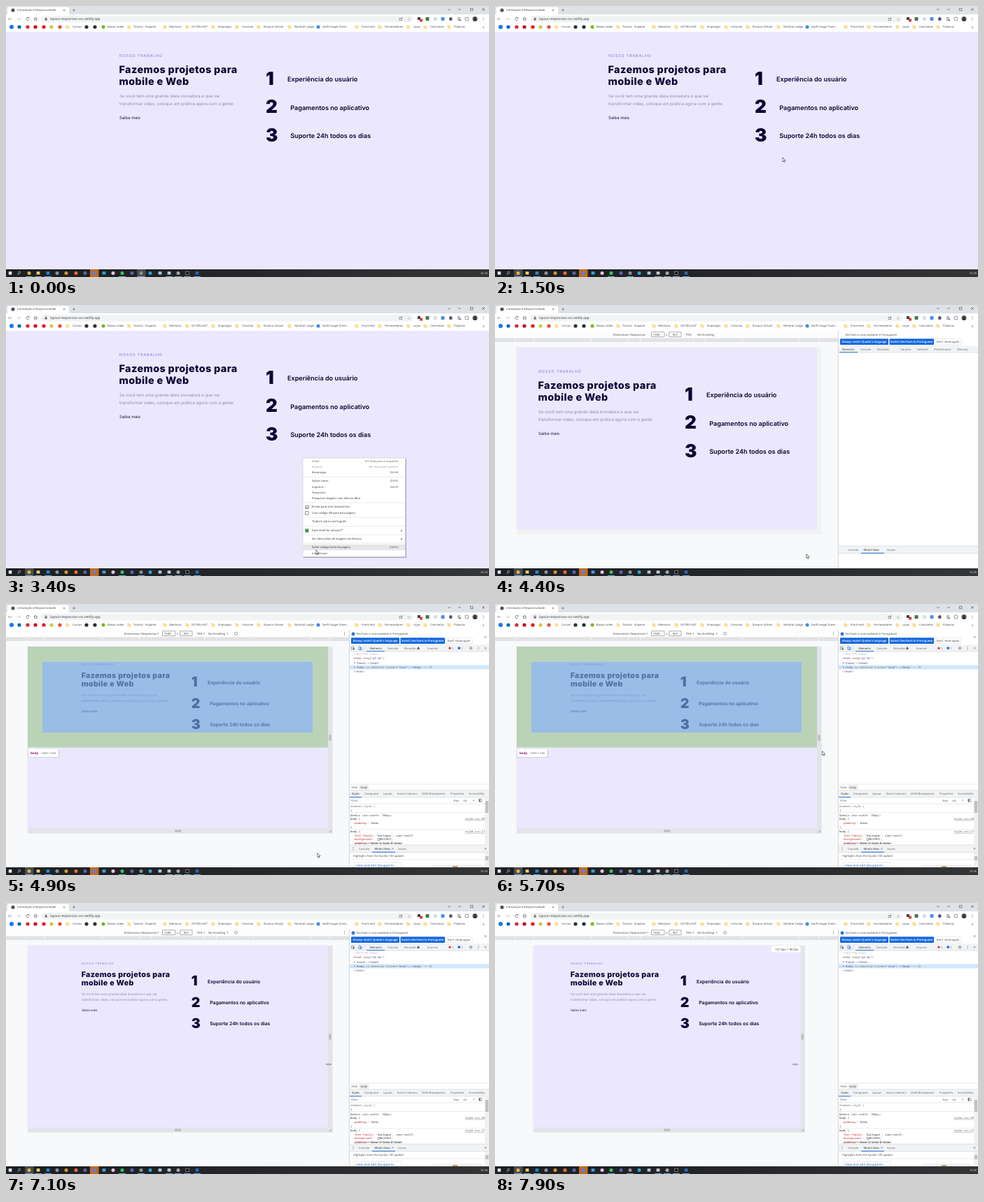
An HTML page with a canvas that plays this animation: 690 by 388 pixels, repeating every 8000 ms.

```html
<!DOCTYPE html>
<html lang="pt-br">
<head>
<meta charset="utf-8">
<title>Layout responsivo</title>
<style>
html, body { margin: 0; width: 100%; height: 100%; overflow: hidden; background: #fff; }
canvas { display: block; width: 690px; height: 388px; }
</style>
</head>
<body>
<canvas id="stage"></canvas>
<script>
const W = 690, H = 388, LOOP = 8000;
const UI = '"Open Sans", sans-serif', MONO = '"Noto Sans Mono", monospace', PAGE = 'Inter, sans-serif';
const LILAC = '#ebe8fd', NAVY = '#0b0432', BLUE = '#1669db', GREY = '#5f6368';

const canvas = document.getElementById('stage');
const ctx = canvas.getContext('2d');
const ratio = window.devicePixelRatio || 1;
canvas.width = W * ratio;
canvas.height = H * ratio;
ctx.textRendering = 'geometricPrecision';

const clamp01 = v => Math.max(0, Math.min(1, v));

function rect(color, x, y, w, h, r = 0) {
  ctx.fillStyle = color;
  ctx.beginPath();
  ctx.roundRect(x, y, w, h, r);
  ctx.fill();
}

function frame(color, x, y, w, h, r = 0) {
  ctx.strokeStyle = color;
  ctx.lineWidth = 0.6;
  ctx.beginPath();
  ctx.roundRect(x, y, w, h, r);
  ctx.stroke();
}

function dot(color, x, y, r) {
  ctx.fillStyle = color;
  ctx.beginPath();
  ctx.arc(x, y, r, 0, Math.PI * 2);
  ctx.fill();
}

function line(color, width, ...points) {
  ctx.strokeStyle = color;
  ctx.lineWidth = width;
  ctx.beginPath();
  for (let i = 0; i < points.length; i += 2) ctx.lineTo(points[i], points[i + 1]);
  ctx.stroke();
}

function poly(color, ...points) {
  ctx.fillStyle = color;
  ctx.beginPath();
  for (let i = 0; i < points.length; i += 2) ctx.lineTo(points[i], points[i + 1]);
  ctx.fill();
}

// y is the middle of the capital letters
function text(str, x, y, size = 4.1, color = '#3c4043', o = {}) {
  ctx.font = `${o.weight || 400} ${size}px ${o.font || UI}`;
  ctx.textAlign = o.align || 'left';
  ctx.letterSpacing = `${o.spacing || 0}px`;
  ctx.fillStyle = color;
  ctx.fillText(str, x, y + size * 0.36);
}

function cross(x, y, r, color = GREY) {
  line(color, 0.6, x - r, y - r, x + r, y + r);
  line(color, 0.6, x - r, y + r, x + r, y - r);
}

function kebab(x, y, color = GREY) {
  for (const d of [-1.8, 0, 1.8]) dot(color, x, y + d, 0.5);
}

function folder(x, y) {
  rect('#edc95c', x - 2.4, y - 2.4, 2.4, 2);
  rect('#fbdf8c', x - 2.4, y - 1.7, 4.9, 4.1, 0.4);
}

function caret(x, y, color = GREY) {
  poly(color, x - 1.2, y - 0.6, x + 1.2, y - 0.6, x, y + 0.9);
}

function triangle(x, y, color = GREY) {
  poly(color, x, y - 1.2, x + 1.6, y, x, y + 1.2);
}

const BOOKMARKS = [
  [88, 95, 'Cursos'], [139, 145, 'Baixar vídeo', '#7cb518'], [176, 182, 'Tutoria - Viajante'],
  [227, 233, 'Mentoria'], [259, 265, 'GIT/ZELHUT'], [296, 303, 'Empregos'], [330, 337, 'Convívio'],
  [361, 368, 'Ruvano School'], [405, 412, 'Nimbral Lodge'], [446, 452, 'Swift Image Tuner...', '#3c8bea'],
  [501, 508, 'Front-end'], [534, 541, 'Fornecedores'], [575, 582, 'Lojas'],
  [599, 606, 'Camisetas'], [633, 640, 'Palavras']
];

function browserBars() {
  rect('#dee1e6', 0, 0, W, 13);
  rect('#fff', 2, 1.5, 88, 12, 2.5);
  rect('#fff', 0, 12, W, 25);
  dot('#50555b', 10, 6, 2.6);
  text('Introdução à Responsividade', 16, 6, 4.1);
  cross(83, 6, 1.3);
  line(GREY, 0.6, 95, 6, 99, 6);
  line(GREY, 0.6, 97, 4, 97, 8);
  line('#444', 0.6, 631, 4, 633, 6, 635, 4);
  line('#444', 0.6, 646, 5, 650, 5);
  frame('#444', 663.5, 3.3, 3.4, 3.4);
  cross(682, 5, 1.7, '#333');

  for (const [x, d, c] of [[6, -1, '#999da1'], [18, 1, '#c0c3c6']]) {
    line(c, 0.7, x - 2.5, 18.5, x + 2.5, 18.5);
    line(c, 0.7, x + d * 0.5, 16.5, x + d * 2.5, 18.5, x + d * 0.5, 20.5);
  }
  ctx.strokeStyle = GREY;
  ctx.lineWidth = 0.8;
  ctx.beginPath();
  ctx.arc(31, 18.5, 2.1, 0.5, 5.6);
  ctx.stroke();
  poly(GREY, 31.3, 18, 33.3, 18, 33.3, 16);
  line(GREY, 0.8, 39.6, 18.5, 42.3, 16, 45, 18.5);
  frame(GREY, 40.5, 18.3, 3.6, 2.5);
  rect('#f1f3f4', 50, 14, 532, 9.4, 4.7);
  rect(GREY, 55.6, 18, 3, 2.6, 0.3);
  frame(GREY, 56.2, 16.4, 1.8, 2.2, 0.8);
  text('layout-responsivo-css.netlify.app', 63, 18.6, 4.73, '#303236');
  frame(GREY, 562, 17.5, 3.6, 3);
  line(GREY, 0.7, 564, 18.5, 566.5, 16.3);
  text('☆', 576, 18.5, 6, GREY, { align: 'center', font: '"DejaVu Sans", sans-serif' });

  rect('#34434e', 588, 16, 4, 4);
  rect('#e53935', 591, 18.5, 4, 4, 0.6);
  rect('#44784a', 599.5, 16, 5, 5, 0.5);
  rect('#d7dcea', 611, 16, 5, 5, 1);
  rect('#4b8df5', 621.5, 16, 5, 5, 1);
  rect('#50555b', 633.2, 16.8, 4.2, 4, 0.5);
  dot('#50555b', 635.3, 16.7, 1);
  for (const y of [16.7, 18.5, 20.3]) line('#50555b', 0.7, 645, y, 649, y);
  dot('#50555b', 649, 20.4, 1);
  frame('#50555b', 656, 16.2, 4.5, 4.5, 0.5);
  dot('#69635f', 670, 18.5, 3.6);
  dot('#252129', 670, 17.6, 1.4);
  rect('#252129', 667.8, 19.2, 4.4, 2, 1);
  kebab(682, 18.5);

  dot('#1877f2', 8, 30, 3);
  const marks = [[19, '#0a66c2'], [31, '#df2638'], [42, '#c8101c'], [54, '#f0141e'], [65, '#c4cd48'],
    [77, '#de5043'], [115, '#303030'], [127, '#25313c']];
  for (const [x, c] of marks) dot(c, x, 30, 2.6);
  for (const [ix, tx, label, color] of BOOKMARKS) {
    if (color) dot(color, ix, 30, 2.5); else folder(ix, 30);
    text(label, tx, 30, 4.1);
  }
  text('»', 682, 29.8, 5.5, '#444', { align: 'center' });
}

const TASKS = [
  [33, '#e0b43c'], [46, '#f5cf68'], [60, '#2489d1'], [73, '#8a929a'], [86, '#d79a2f'], [100, '#f06c36'],
  [113, '#5965a8'], [126, '#5b7df0'], [140, '#3ca0e0'], [153, '#e6c6df'], [166, '#38c763'], [180, '#5a62b7'],
  [193, '#8c9096'], [206, '#2ca4dc'], [220, '#a7cbe3'], [233, '#c9cccf'], [246, '#aaa69c'],
  [259, '#0b0d0e'], [273, '#2d67b8']
];

function taskbar(t) {
  const shade = ctx.createLinearGradient(0, 0, W, 0);
  shade.addColorStop(0, '#1c1f23');
  shade.addColorStop(0.4, '#222427');
  shade.addColorStop(1, '#343537');
  rect(shade, 0, 377, W, 11);
  rect('#484c52', t < 100 ? 187 : 27, 377, 12.5, 11);
  rect('#c06c22', 120, 377, 12.5, 11);
  rect('#e6eaee', 3.8, 380.2, 4.5, 4.5);
  frame('#ddd', 17.8, 380.2, 3, 3, 1.5);
  line('#ddd', 0.7, 18.2, 383, 16.8, 385);
  TASKS.forEach(([x, c], i) => {
    if ([1, 2, 8, 14, 15, 17, 18].includes(i)) rect(c, x - 2.4, 380.2, 4.8, 4.4, 0.5);
    else dot(c, x, 382.4, 2.5);
    if (x === 259) frame('#b6babd', 256.6, 380.2, 4.8, 4.4);
    if ([0, 1, 2, 10, 12, 15, 16, 17, 18].includes(i)) rect('#76a9d5', x - 5, 387, 10, 1);
  });
  text(t < 5300 ? '16:35' : '16:36', 688, 382.5, 4, '#f0f0f0', { align: 'right' });
}

function landing(dx, dy, scale) {
  const put = (str, x, y, size, color, weight, spacing) =>
    text(str, x, y, size, color, { font: PAGE, weight, spacing });
  ctx.save();
  ctx.translate(dx, dy);
  ctx.scale(scale, scale);
  put('NOSSO TRABALHO', 162, 71, 5.4, '#7d70da', 400, 0.85);
  put('Fazemos projetos para', 161.5, 91, 14.4, NAVY, 800, 0.38);
  put('mobile e Web', 161.5, 107.8, 14.4, NAVY, 800, 0.38);
  put('Se você tem uma grande ideia inovadora e que vai', 162, 128.5, 6, '#8d88a3');
  put('transformar vidas, coloque em prática agora com a gente.', 162, 140, 6, '#8d88a3');
  put('Saiba mais', 162, 160, 5.9, '#1b1540');
  ['Experiência do usuário', 'Pagamentos no aplicativo', 'Suporte 24h todos os dias'].forEach((label, i) => {
    const y = 103.6 + i * 40.3;
    put(String(i + 1), 371, y, 26, NAVY, 900);
    put(label, i ? 406.2 : 402, y + 1.4, 9.1, NAVY, 600);
  });
  ctx.restore();
}

const MENU = [
  [224, 'Voltar', 'Alt+Seta para a esquerda'], [232, 'Avançar', 'Alt+Seta para a direita'],
  [240, 'Recarregar', 'Ctrl+R'], [252, 'Salvar como...', 'Ctrl+S'], [261, 'Imprimir...', 'Ctrl+P'],
  [269, 'Transmitir...'], [277, 'Pesquisar imagens com Zelvora Mira'], [289, 'Enviar para seus dispositivos'],
  [298, 'Criar código QR para esta página'], [310, 'Traduzir para o português'],
  [323, 'Dark Shelf for Zelvora™'], [335, 'Ver descrições de imagens do Zelvora'],
  [347, 'Exibir código fonte da página', 'Ctrl+U'], [356, 'Inspecionar']
];

function contextMenu(pointer, alpha) {
  ctx.save();
  ctx.globalAlpha = alpha;
  rect('rgba(60,60,80,.35)', 425, 220.5, 147, 141.5);
  rect('#fff', 424, 219, 146.5, 141.5);
  frame('#c4c4cc', 424, 219, 146.5, 141.5);
  for (const [y, label, keys] of MENU) {
    if (pointer[0] > 424 && Math.abs(pointer[1] - y) < 4.3) rect('#e6e6e8', 424.5, y - 4.2, 145.5, 8.4);
    const color = y === 232 ? '#999' : y === 224 ? '#666' : '#333';
    text(label, 437, y, 4.05, color);
    if (keys) text(keys, 560, y, 4.05, color, { align: 'right' });
  }
  for (const y of [246, 283, 304, 316.5, 329, 341]) line('#dedee2', 0.6, 424.5, y, 570, y);
  frame('#444', 427.8, 287.3, 4.4, 3);
  line('#444', 0.6, 427, 291.4, 433, 291.4);
  frame('#444', 427.5, 295.7, 4.6, 4.6);
  rect('#4c8b57', 427.3, 320.5, 5, 5);
  triangle(564.5, 323, '#222');
  triangle(564.5, 335, '#222');
  ctx.restore();
}

// Right edge of the resized viewport; it trails the pointer.
const DRAG = 0.0457, MID = 245.5;
const edgeAt = t => 460 - DRAG * Math.max(0, t - 7380);
const pixelsAt = t => Math.round(1589 - (460 - edgeAt(t)) * 2 / 0.27);

function deviceView(t, loaded) {
  const right = edgeAt(t), left = 2 * MID - right, width = right - left;
  rect('#f8f9fa', 0, 37, 490, 340);
  rect('#fdfdfd', 0, 37, 490, 10.5);
  rect('#e0e2e5', 0, 47.5, 490, 5.5);
  for (const d of [38, 55, 108, 190, 217]) {
    line('#f4f5f6', 1, MID - d, 47.5, MID - d, 53);
    line('#f4f5f6', 1, MID + d, 47.5, MID + d, 53);
  }
  text('Dimensions: Responsive', 168.5, 42.3);
  frame('#777', 223.5, 38.8, 18.5, 6.8, 0.5);
  frame('#777', 248.5, 38.8, 17.5, 6.8, 0.5);
  text(String(pixelsAt(t - 32)), 226, 42.3);
  text('x', 244.2, 42.3);
  text('967', 254, 42.3);
  text('75%', 272.5, 42.3);
  text('No throttling', 289, 42.3);
  if (loaded) {
    for (const x of [217, 283, 316.5]) caret(x, 42.3);
    frame(GREY, 326.6, 40.3, 4, 4, 2);
    kebab(483.5, 42.3);
  }

  const strip = loaded ? '#e3e4ea' : '#f1f2f4';
  rect('#f0f1f5', left - 1.2, 60, width + 2.4, 262);
  rect(strip, right, 61, 6.5, 267.5);
  rect(strip, left, 321, width + 6.5, 7.5);
  rect(LILAC, left, 61, width, 260.5);
  if (!loaded) return landing(-100, 24, 1);
  for (const d of [-1, 0.8]) {
    line('#777', 0.6, right + 3 + d, 187.5, right + 3 + d, 195.5);
    line('#777', 0.6, 241, 325 + d, 250, 325 + d);
  }
  line('#777', 0.6, right + 1.5, 327, right + 5, 323.5);
  line('#777', 0.6, right + 3.5, 327, right + 5, 325.5);
  landing(-13.5, 33.7, 0.75);

  if (t >= 4900 && t < 5900) bodyHighlight();
  if (t >= 7400) {
    rect('#fff', right - 41.5, 61.5, 41.5, 9);
    text(`${pixelsAt(t)}px × 967px`, right - 3, 66.2, 4.5, '#444', { align: 'right' });
  }
}

function bodyHighlight() {
  ctx.fillStyle = 'rgba(147,196,125,.55)';
  ctx.beginPath();
  ctx.rect(31, 61, 429, 144.5);
  ctx.rect(52, 82.5, 386, 101.5);
  ctx.fill('evenodd');
  rect('rgba(111,168,220,.66)', 52, 82.5, 386, 101.5);
  rect('rgba(0,0,0,.16)', 31.5, 208.5, 44.5, 11.2, 1);
  rect('#fff', 32, 208, 43, 11, 1);
  poly('#fff', 35, 208.2, 38, 205.5, 41, 208.2);
  text('body', 35, 213.6, 4.5, '#881280', { weight: 700 });
  text('1589 × 536', 50, 213.6, 4.2, '#666');
}

function tabs(list, y) {
  for (const [x, label, active] of list) text(label, x, y, 4.05, active ? '#222' : GREY);
}

function underline(x, y, w) { rect(BLUE, x, y, w, 0.9); }

function code(x, y, ...parts) {
  for (const [str, color] of parts) {
    text(str, x, y, 3.95, color, { font: MONO });
    x += ctx.measureText(str).width;
  }
  return x;
}

function devtools(loaded) {
  rect('#fff', 490, 37, 200, 340);
  line('#c8ccd0', 0.8, 490.4, 37, 490.4, 377);
  text('DevTools is now available in Portuguese!', 500.5, 43, 3.95);
  rect(BLUE, 493, 48.3, 69, 8.6, 1);
  rect(BLUE, 563.5, 48.3, 63.5, 8.6, 1);
  text("Always match Quolto's language", 527.5, 52.5, 4.1, '#fff', { weight: 600, align: 'center' });
  text('Switch DevTools to Portuguese', 595.2, 52.5, 4.1, '#fff', { weight: 600, align: 'center' });
  frame('#d8dbdf', 628, 48.3, 38, 8.5, 1);
  text("Don't show again", 630.5, 52.5, 4.1);
  rect('#f1f3f4', 491, 58, 199, 10);
  line('#cfd3d7', 0.6, 491, 68, 690, 68);

  rect('#f1f3f4', 491, 345, 199, 10.5);
  line('#cfd3d7', 0.6, 491, 345, 690, 345);
  line('#cfd3d7', 0.6, 491, 355.5, 690, 355.5);
  tabs([[504, 'Console'], [526.5, "What's New", true], [560, 'Issues']], 350.3);
  underline(523, 354.8, 33);
  if (!loaded) {
    tabs([[496, 'Elements', true], [522, 'Console'], [546, 'Recorder'], [579.5, 'Sources'],
      [603, 'Network'], [627, 'Performance'], [660, 'Memory']], 63.2);
    underline(492, 67.2, 26);
    return;
  }

  dot(BLUE, 496, 43, 2.4);
  rect('#fff', 495.7, 42.5, 0.6, 1.8);
  cross(685, 47.5, 1.4);
  frame(GREY, 493.5, 61.3, 3.6, 3.6, 0.5);
  poly(GREY, 495.3, 62.8, 498.5, 64, 496.6, 66);
  frame(BLUE, 503.8, 61, 2.6, 4.5, 0.4);
  frame(BLUE, 506.2, 62.5, 2, 3, 0.2);
  line('#cfd3d7', 0.6, 512, 60, 512, 66.5);
  tabs([[519.5, 'Elements', true], [545, 'Console'], [569, 'Recorder'], [602, 'Sources']], 63.2);
  poly(GREY, 588.5, 61.3, 589.5, 61.3, 591, 65, 587, 65);
  underline(515, 67.2, 26);
  dot('#e0433a', 634, 63.2, 1.7);
  text('1', 637, 63.2, 4);
  rect(BLUE, 645.5, 61.6, 3.4, 3.2, 0.5);
  text('1', 650, 63.2, 4);
  frame(GREY, 662.3, 61.4, 3.6, 3.6, 1.8);
  dot(GREY, 664.1, 63.2, 0.7);
  kebab(675, 63.2);
  cross(685, 63.2, 1.4);

  const tag = '#5c3c62', attr = '#7d5a34', value = '#3a3a86', soft = '#888';
  rect('#cfe8fc', 491, 87.6, 199, 6);
  code(496, 72, ['<!DOCTYPE html>', '#b0b0b0']);
  code(496, 78, ['<html ', tag], ['lang', attr], ['="', tag], ['pt-br', value], ['">', tag]);
  code(500, 84.3, ['<head>', tag], ['…', soft], ['</head>', tag]);
  code(500, 90.6, ['<body ', tag], ['cz-shortcut-listen', attr], ['="', tag], ['true', value], ['">', tag],
    ['…', soft], ['</body>', tag], [' == $0', soft]);
  code(496, 97, ['</html>', tag]);
  triangle(497.3, 84.3);
  triangle(497.3, 90.6);
  text('…', 491.5, 90.3, 4, GREY);

  line('#d5d8dc', 0.6, 491, 258, 690, 258);
  rect('#eceef0', 504.5, 259, 14, 7);
  text('html', 493.5, 262.3, 4.1, '#444');
  text('body', 506.5, 262.3, 4.1, '#444');
  rect('#f1f3f4', 491, 266.7, 199, 10);
  line('#cfd3d7', 0.6, 491, 266.7, 690, 266.7);
  line('#cfd3d7', 0.6, 491, 276.8, 690, 276.8);
  tabs([[494, 'Styles', true], [512, 'Computed'], [539, 'Layout'], [559, 'Event Listeners'],
    [594, 'DOM Breakpoints'], [635, 'Properties'], [661, 'Accessibility']], 271.8);
  underline(491, 276, 17);
  text('Filter', 493, 281.5, 4.1, GREY);
  text(':hov', 639, 281.5);
  text('.cls', 652.5, 281.5);
  text('+', 668, 281, 5.5, GREY, { align: 'center' });
  frame(GREY, 675.8, 279.2, 4, 4);
  rect(GREY, 676, 279.4, 1.6, 3.6);
  line('#d5d8dc', 0.6, 491, 286, 684, 286);
  stylesPane(soft);

  rect('#f1f1f1', 684, 277.5, 6, 67);
  rect('#bfc1c3', 684.7, 282, 4.6, 17);
  kebab(496, 350.3);
  cross(552.5, 350.3, 1.1);
  cross(685, 350.3, 1.4);
  text('Highlights from the Quolto 100 update', 496, 360.7, 4, '#444');
  line('#dfe1e4', 0.6, 491, 366, 684, 366);
  frame('#d5d8dc', 497, 370, 68, 8);
  text('View and edit @supports', 500, 374.2, 4.7, BLUE);
  rect('#f1f0ef', 610, 373.5, 70, 3.5);
  rect('#c2a06c', 638, 375, 7, 2);
  rect('#f1f1f1', 684, 356, 6, 21);
  rect('#bfc1c3', 684.7, 361, 4.6, 6);
}

function stylesPane(soft) {
  const ink = '#333', prop = '#c02a2a';
  const link = y => {
    text('style.css:' + (y < 320 ? '99' : '17'), 684, y, 3.95, '#555', { font: MONO, align: 'right' });
    line('#777', 0.4, 655.5, y + 2.3, 683.5, y + 2.3);
  };
  ctx.save();
  ctx.beginPath();
  ctx.rect(491, 277, 193, 67.6);
  ctx.clip();
  code(492, 289.3, ['element.style {', '#666']);
  code(492, 295.2, ['}', ink]);
  line('#dfe1e4', 0.6, 491, 298.5, 684, 298.5);
  code(492, 302.4, ['@media (min-width: 700px)', '#555']);
  code(492, 307.6, ['body {', ink]);
  link(307.6);
  code(498, 313.6, ['padding', prop], [':', ink], ['▸ ', soft], ['8rem;', ink]);
  code(492, 319.8, ['}', ink]);
  line('#dfe1e4', 0.6, 491, 322.5, 684, 322.5);
  code(492, 326, ['body {', ink]);
  link(326);
  code(498, 331.5, ['font-family', prop], [": 'Epilogue', sans-serif;", ink]);
  code(498, 337, ['background', prop], [':', ink], ['▸ ', soft], ['  #ECE9FD;', ink]);
  rect(LILAC, 531, 335.5, 3, 3);
  frame('#888', 531, 335.5, 3, 3);
  const end = code(498, 342.3, ['padding', prop], [':', ink], ['▸ ', soft], ['0rem 2.2rem 0.6rem;', ink]);
  line('#555', 0.5, 498, 342.3, end, 342.3);
  ctx.restore();
}

const PATH = [
  [100, 312, 369], [300, 312, 369], [1200, 411, 217], [2000, 411, 217], [2100, 423, 218], [2500, 423, 218],
  [3300, 442, 349], [3400, 443, 350.7], [3600, 445, 356.5], [5000, 445, 356.5], [5600, 467.5, 210.5],
  [6200, 467.5, 210.5], [6800, 461, 231], [7200, 461, 231], [8000, 461 - 800 * DRAG, 231]
];

function pointerAt(t) {
  const i = Math.max(1, PATH.findIndex(p => p[0] >= t));
  const [t0, x0, y0] = PATH[i - 1], [t1, x1, y1] = PATH[i];
  let k = clamp01((t - t0) / (t1 - t0));
  if (t < 7200) k = k * k * (3 - 2 * k);
  return [x0 + (x1 - x0) * k, y0 + (y1 - y0) * k];
}

function pointer(t, [x, y]) {
  if (t < 100) return;
  ctx.save();
  ctx.translate(x, y);
  if (t >= 6800) {
    for (const s of [-1, 1]) {
      poly('#666', s * 4, 0, s * 2.4, -1.3, s * 2.4, 1.3);
      line('#666', 0.5, s * 2.4, 0, s * 0.7, 0);
      line('#666', 0.5, s * 0.7, -1.4, s * 0.7, 1.4);
    }
  } else {
    const arrow = [0, 0, 0, 6, 1.3, 4.8, 2.2, 6.8, 3.1, 6.4, 2.3, 4.4, 4.1, 4.2, 0, 0];
    poly('#fff', ...arrow);
    line('#222', 0.6, ...arrow);
  }
  ctx.restore();
}

function draw(t) {
  const at = pointerAt(t);
  ctx.setTransform(ratio, 0, 0, ratio, 0, 0);
  rect(LILAC, 0, 0, W, H);
  if (t < 4400) {
    landing(0, 0, 1);
    if (t >= 2300 && t < 3900) contextMenu(at, t < 3800 ? 1 : 0.4);
  } else {
    const loaded = t >= 4600;
    deviceView(t, loaded);
    devtools(loaded);
  }
  browserBars();
  taskbar(t);
  pointer(t, at);
}

function tick() {
  draw(Math.floor(performance.now() % LOOP / 100) * 100);
  requestAnimationFrame(tick);
}
tick();
</script>
</body>
</html>
```
